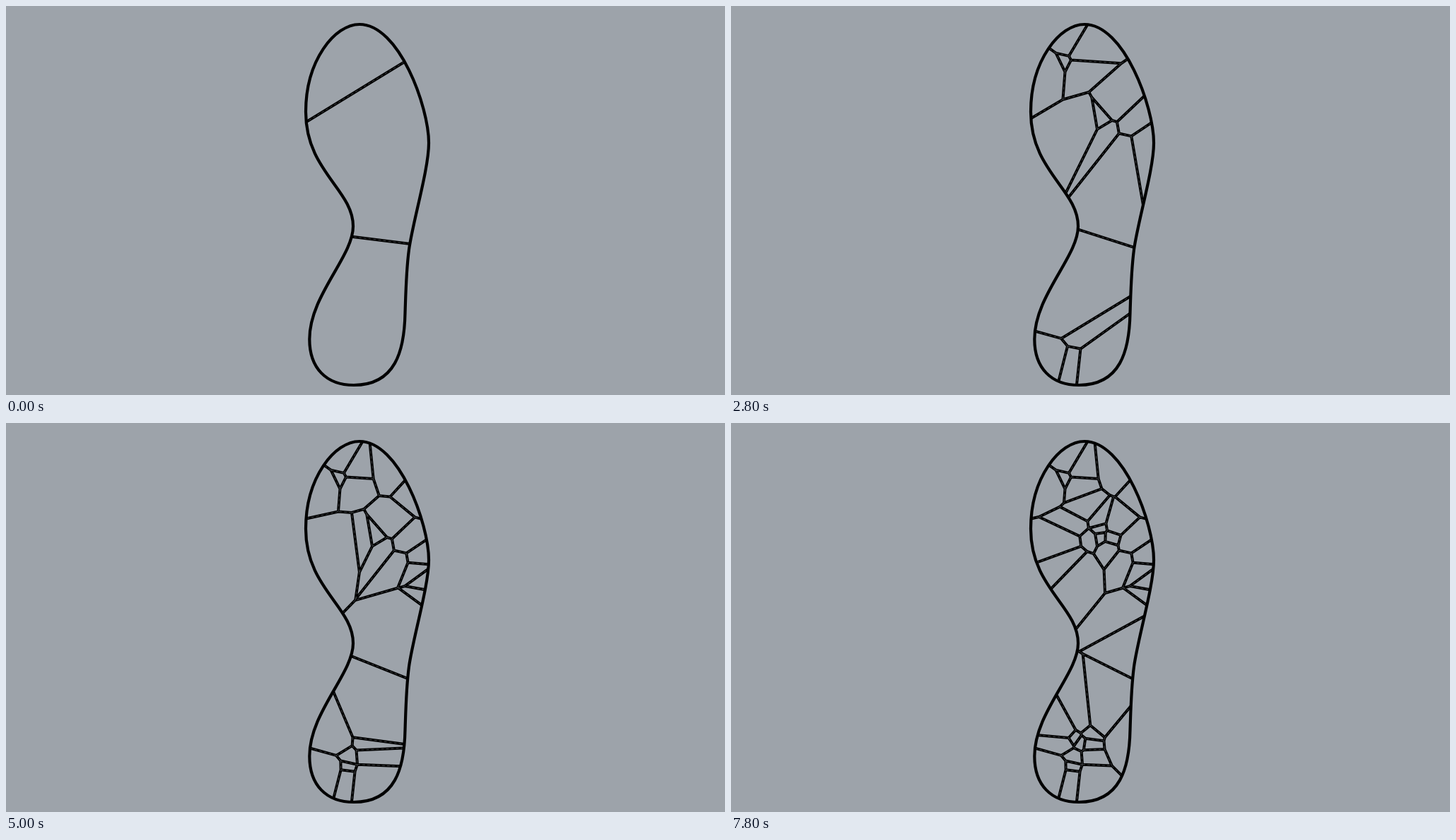
An HTML page with a canvas that plays this animation: 1017 by 551 pixels, repeating every 8000 ms.

```html
<!DOCTYPE html>
<html lang="en">
<head>
<meta charset="utf-8">
<title>Growing cells in a sole</title>
<style>
  html, body { margin: 0; width: 100%; height: 100%; overflow: hidden; background: #9da3aa; }
  canvas { display: block; }
</style>
</head>
<body>
<canvas id="stage" width="1017" height="551"></canvas>
<script>
const STEP = 200, LOOP = 8000, FIRST = 3;
const ctx = document.getElementById('stage').getContext('2d');

const sole = new Path2D(`M500 26
  C556 26 598 143 598 194 C598 231 575.5 305 570 345
  C566 375 565.5 405 564.5 435 C563.5 488 551 537 492 537
  C453 537 429.3 513 429.3 472 C429.3 410 491 355 491 312
  C491 260 424 234 424 150 C424 77 465 26 500 26Z`);

// Cell centres: one more joins at every step, all walls follow from them.
const sites = [
  [471.5, 77.3], [523.4, 162], [482.1, 494.8],
  [531.7, 175.8], [486.6, 472.2], [541, 146.5], [487, 69.3], [563.3, 170],
  [460.5, 82.6], [557.5, 196.2], [504.5, 497.2], [508.8, 164.5], [475, 62.2],
  [486, 84.6], [474.9, 453], [578.5, 192.6], [464.5, 490.3],
  [549.8, 63], [482.7, 489.9], [479.4, 168.3], [505.6, 470.8],
  [577, 263.6], [507, 439.4], [584, 94.2], [577.5, 204.3],
  [504.9, 455.2], [593.7, 226.4], [590.2, 245.6],
  [519.2, 140.3], [519, 425], [588.9, 285.5], [521.8, 149.9],
  [550.6, 451.2], [535.7, 162.4], [497, 427.3],
  [501, 124.8], [476.2, 438.7], [496.8, 198.8], [490.6, 144.6],
  [485, 446.5], [487.2, 189.5], [495.3, 453.8]
];

// Part of the bisector of a and b that no other site is closer to.
function wall(a, b, set) {
  const mx = (a[0] + b[0]) / 2, my = (a[1] + b[1]) / 2;
  const len = Math.hypot(b[0] - a[0], b[1] - a[1]);
  const dx = (a[1] - b[1]) / len, dy = (b[0] - a[0]) / len;
  let lo = -700, hi = 700;
  for (const c of set) {
    if (c === a || c === b) continue;
    const vx = c[0] - a[0], vy = c[1] - a[1];
    const slope = vx * dx + vy * dy;
    const gap = vx * ((c[0] + a[0]) / 2 - mx) + vy * ((c[1] + a[1]) / 2 - my);
    if (slope > 0) hi = Math.min(hi, gap / slope);
    else lo = Math.max(lo, gap / slope);
    if (lo >= hi) return null;
  }
  return [lo, hi].map(t => [mx + dx * t, my + dy * t]);
}

function cells(count) {
  const set = sites.slice(0, count), path = new Path2D();
  set.forEach((a, i) => {
    for (const b of set.slice(i + 1)) {
      const ends = wall(a, b, set);
      if (!ends) continue;
      path.moveTo(...ends[0]);
      path.lineTo(...ends[1]);
    }
  });
  return path;
}

function stroke(path, color, width, dash = []) {
  ctx.strokeStyle = color;
  ctx.lineWidth = width;
  ctx.setLineDash(dash);
  ctx.stroke(path);
}

function draw(step) {
  const net = cells(FIRST + step);
  ctx.fillStyle = '#9da3aa';
  ctx.fillRect(0, 0, 1017, 551);
  ctx.save();
  ctx.clip(sole);
  ctx.lineCap = 'round';
  stroke(net, '#000', 4);
  ctx.lineCap = 'butt';
  stroke(net, 'rgba(157,163,170,0.45)', 0.9, [4, 3]);
  ctx.restore();
  stroke(sole, '#000', 4.2);
}

let shown = -1;
function tick() {
  const step = Math.floor(performance.now() % LOOP / STEP);
  if (step !== shown) draw(shown = step);
  requestAnimationFrame(tick);
}
tick();
</script>
</body>
</html>
```
